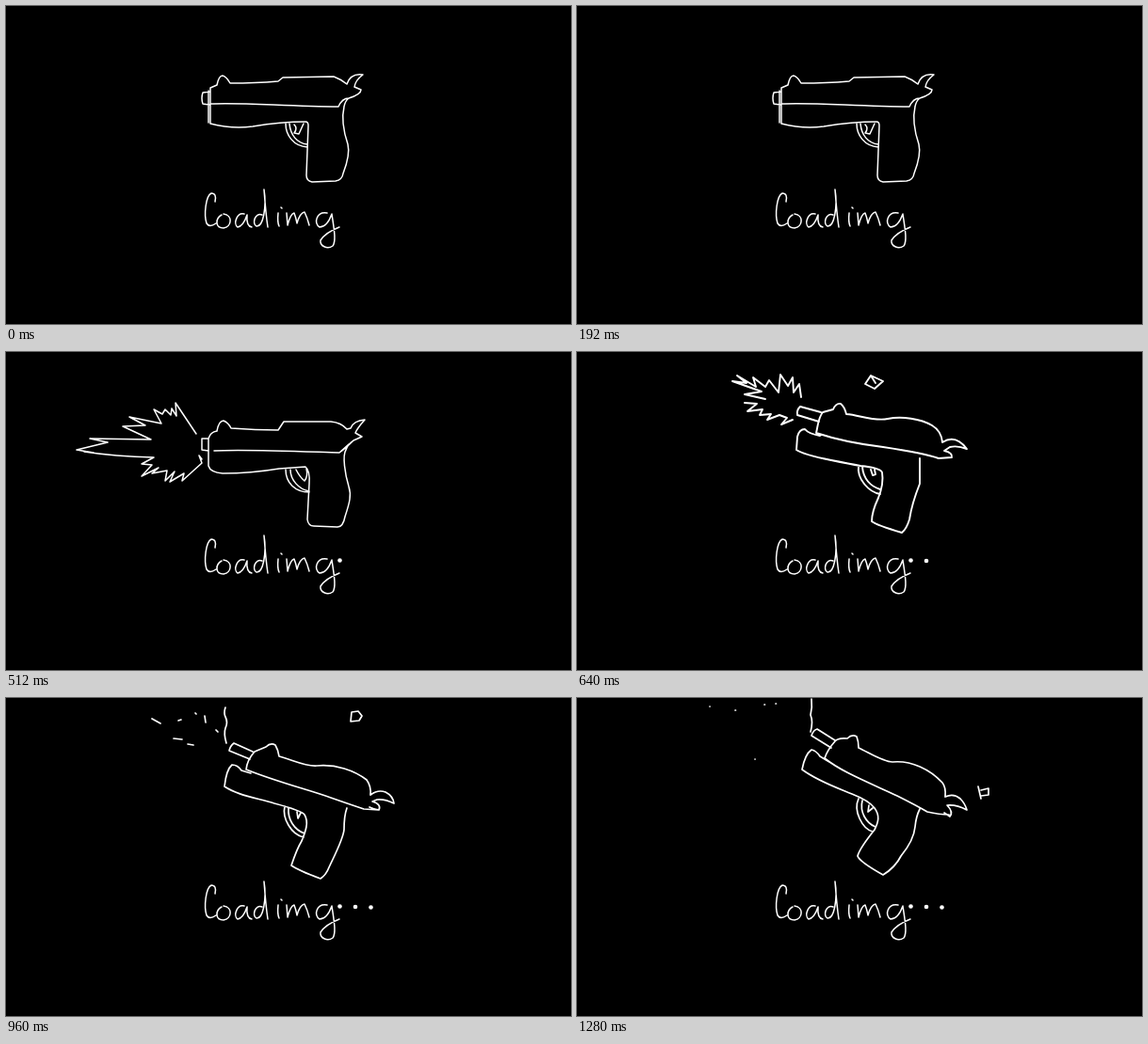
These frames come from a looping animation (600x338 px, 1.52 s). An HTML page with a canvas:

```html
<!DOCTYPE html>
<html lang="en">
<head>
<meta charset="utf-8">
<title>Loading</title>
<style>
  html, body { margin: 0; width: 100%; height: 100%; overflow: hidden; background: #000; }
  canvas { display: block; width: 600px; height: 338px; }
</style>
</head>
<body>
<canvas id="stage" width="600" height="338" role="img" aria-label="Loading"></canvas>
<script>
const ctx = document.getElementById('stage').getContext('2d');
const LOOP = 1520, STEP = 320;

const word = [
  'M222 208Q224 199 218 199C212 202 210 222 213 231Q216 236 223 231',
  'M229 222C222 226 222 236 231 236C240 235 241 222 231 221',
  'M253 221C245 219 241 232 246 235Q252 234 256 222Q255 234 261 235',
  'M272 222C264 219 261 232 266 234C273 235 277 214 274 195Q276 222 278 235',
  'M289 220Q288 230 290 234M292 214L293 215',
  'M298 220L299 233Q302 221 306 220Q308 225 309 231Q312 220 317 219Q320 225 322 233',
  'M341 220C330 218 326 231 333 235Q341 235 346 221C348 235 351 250 347 255C341 259 333 255 334 249Q339 241 354 235'
];

// Each pose: line width, number of dots after the word, strokes
const poses = [
  { width: 1.5, dots: 0, strokes: [
    'M217 91L209 92Q207 98 209 104L216 105M215 90L215 124',
    'M217 87L224 84Q226 74 230 74Q234 75 238 82Q265 82 289 80L294 76L348 75Q356 78 362 83',
    'M362 83Q366 71 379 73Q371 79 370 86L377 89Q377 94 364 98Q357 98 353 107',
    'M217 104C250 102 300 107 353 107',
    'M217 87L217 125Q240 131 262 128C280 125 300 123 318 123Q321 123 321 127L319 180Q319 186 325 187L350 186Q357 185 358 178C363 165 365 155 363 147C359 135 356 120 359 107Q360 101 364 98',
    'M297 125C297 137 305 149 320 150M301 125C302 137 309 146 320 147',
    'M306 126Q310 130 306 135L311 136L316 125'
  ] },
  { width: 1.5, dots: 1, strokes: [
    'M215 92L208 92L208 104L215 105',
    'M215 92Q217 85 224 84Q226 73 231 73Q236 75 239 81Q265 83 289 83L295 74L345 74Q356 75 362 82',
    'M362 82L366 81Q369 73 381 72Q373 81 371 86L378 90L369 94Q360 103 354 107L364 98',
    'M221 105C250 103 320 106 354 107',
    'M215 92L215 121Q217 128 230 129Q260 129 290 124L318 122Q323 126 322 140L320 178Q321 185 327 185L352 186Q358 186 360 175C365 160 367 152 364 143C360 130 357 110 361 104Q363 98 369 94',
    'M297 125C297 139 307 149 322 149M302 125C302 136 311 146 322 148',
    'M308 125Q312 133 317 137Q321 132 319 124',
    'M202 87L180 54L181 68L176 60L175 67L169 61L166 66L157 61L165 76L131 69L148 78L124 79L154 93L89 92L108 96L75 104L93 107',
    'M83 106Q115 111 157 112L144 119L155 120L144 132L162 123L155 129L171 126L169 137L179 127L174 138L189 129L187 137L208 118L205 110L208 114'
  ] },
  { width: 1.9, dots: 2, strokes: [
    'M259 64L237 58Q233 62 234 67L257 74',
    'M254 86C256 78 256 70 261 64L272 61Q275 54 280 55Q284 58 286 66C300 67 315 74 330 71C345 68 365 71 377 78Q387 84 388 96',
    'M388 96Q402 87 414 103Q404 99 396 101L390 105Q399 107 398 112L384 113',
    'M254 86C275 93 300 98 325 101C345 104 370 108 384 113',
    'M258 89Q246 87 242 82Q236 82 234 90L233 104C240 109 255 112 270 115Q290 119 301 121Q322 123 324 128C326 140 322 150 320 155Q313 170 313 180Q318 184 345 192Q350 188 353 178C355 165 360 150 364 140Q364 125 364 113',
    'M299 121C297 135 310 149 322 151M303 122C304 135 312 143 322 146',
    'M312 125L314 131L317 130L316 125',
    'M238 48L236 34L230 43L229 27L224 36L216 24L214 43L204 30L200 37L187 27L190 37L170 25L180 33L165 31L196 42L178 45L200 50',
    'M178 54L191 55L181 63L197 61L194 67L206 66L202 72L215 67L223 70L217 77L229 72',
    'M312 25L325 31L316 39L306 34ZM312 25L317 33'
  ] },
  { width: 1.7, dots: 3, strokes: [
    'M262 57L242 48Q238 51 237 56L259 65',
    'M255 76Q256 66 264 57L276 52Q281 47 286 50Q289 55 290 62C305 66 318 73 330 72C350 70 370 77 383 87Q388 94 387 103',
    'M387 103Q395 97 403 100Q411 104 412 112Q402 107 394 108L389 110Q399 113 396 119Q390 118 386 116',
    'M255 76C290 90 320 97 345 106Q365 113 380 118L396 119',
    'M260 80L250 77Q246 71 240 71Q234 76 232 94C245 103 265 106 285 112C300 116 314 120 317 124C322 132 318 142 314 152Q309 160 303 178Q310 183 334 192Q340 188 343 180C350 165 358 150 359 140Q359 125 362 117',
    'M296 115C293 128 303 145 316 148M300 117C299 129 306 140 317 144',
    'M309 121L310 128L313 122',
    'M233 10Q231 16 233 20Q236 26 233 32Q231 38 234 48',
    'M155 22L164 27M178 43L187 44M193 49L199 50M201 16L202 17M211 19L212 26M223 34L225 36M183 24L186 23',
    'M367 15L374 14L378 19L375 24L366 25Z'
  ] },
  { width: 1.7, dots: 3, strokes: [
    'M274 45L255 33Q251 34 249 40L270 53',
    'M263 64Q266 55 274 46Q277 42 287 43Q292 38 297 41Q299 46 299 53C310 58 325 68 335 68C355 66 375 76 388 90Q392 95 391 105',
    'M391 105Q400 101 407 107Q412 112 414 119Q403 113 393 114Q400 121 396 126L390 122',
    'M263 64C280 78 310 90 340 104Q360 114 372 121Q385 124 395 124',
    'M268 68L258 62Q254 56 249 55Q242 60 239 76C255 88 275 95 292 102Q310 109 316 117C322 125 320 132 316 140C308 150 300 160 298 168Q300 174 325 188Q338 180 344 168C353 157 358 148 359 137Q360 126 364 118',
    'M299 107C293 120 303 139 314 142M303 109C300 121 307 133 317 137',
    'M310 114L309 121L314 117',
    'M249 1Q250 10 248 18Q251 25 248 36',
    'M141 9h.1M168 13h.5M199 7h.5M211 6h.5M189 65h.1',
    'M426 94L429 107M429 98L437 96L437 103L429 104'
  ] }
];

const toPath = list => new Path2D(list.join(''));
const wordPath = toPath(word);
for (const pose of poses) pose.path = toPath(pose.strokes);

function draw(time) {
  const pose = poses[Math.floor((time % LOOP) / STEP)];
  ctx.fillStyle = '#000';
  ctx.fillRect(0, 0, 600, 338);
  ctx.strokeStyle = ctx.fillStyle = '#fff';
  ctx.lineCap = ctx.lineJoin = 'round';
  ctx.lineWidth = pose.width;
  ctx.stroke(pose.path);
  ctx.lineWidth = 1.5;
  ctx.stroke(wordPath);
  for (let i = 0; i < pose.dots; i++) {
    ctx.beginPath();
    ctx.arc(354.5 + i * 16.5, 221.5 + i * 0.5, 2.3, 0, Math.PI * 2);
    ctx.fill();
  }
}

const start = performance.now();
function tick() {
  draw(performance.now() - start);
  requestAnimationFrame(tick);
}
tick();
</script>
</body>
</html>
```
